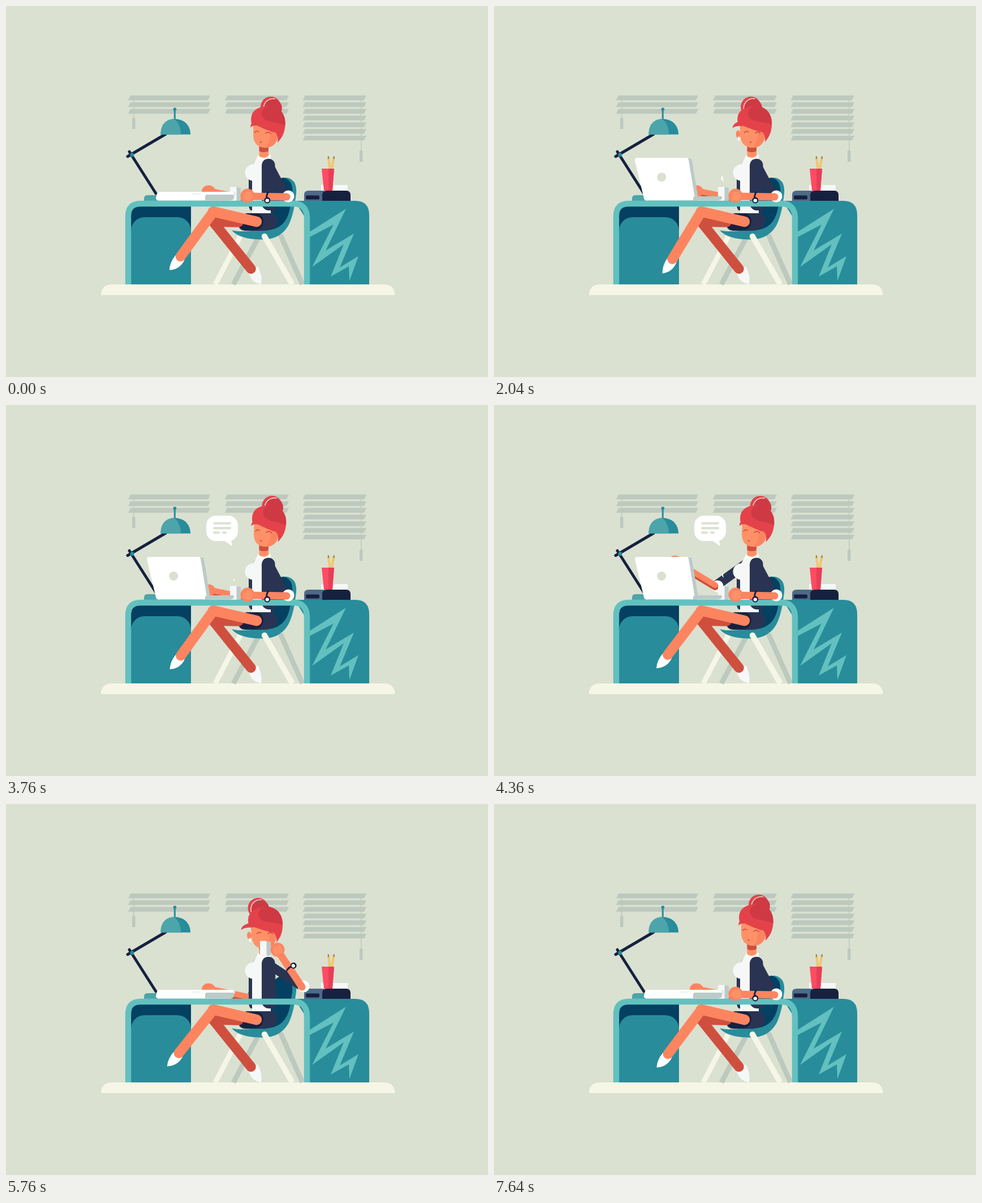
An HTML page with a canvas for the animation above (7680 ms loop, 852x657 px).

```html
<!DOCTYPE html>
<html lang="en">
<head>
<meta charset="utf-8">
<title>Office desk</title>
<style>
html, body { margin: 0; width: 100%; height: 100%; overflow: hidden; background: #dae1d1; }
canvas { display: block; }
</style>
</head>
<body>
<canvas id="stage" width="852" height="657"></canvas>
<script>
const g = document.getElementById('stage').getContext('2d');
const LOOP = 7680;
const C = {
  bg: '#dae1d1', blind: '#bdc9be', teal: '#288c9b', mint: '#62c1bf', sea: '#4ca5aa',
  deep: '#044061', navy: '#2a3452', ink: '#16213f', cream: '#f6f6e6', white: '#fff',
  shirt: '#f6f8f8', grey: '#bccac8', skin: '#fc8560', glow: '#ff9168', shade: '#cf4f3e',
  hair: '#e4424a', dark: '#cf3944'
};

const clamp = x => Math.max(0, Math.min(1, x));
const ease = x => (1 - Math.cos(Math.PI * clamp(x))) / 2;

// Eased value (or list of values) from rows of [time, ...values]
function key(t, rows) {
  let i = 0;
  while (i < rows.length - 2 && t > rows[i + 1][0]) i++;
  const a = rows[i], b = rows[i + 1], k = ease((t - a[0]) / (b[0] - a[0]));
  const out = a.slice(1).map((v, j) => v + (b[j + 1] - v) * k);
  return out.length > 1 ? out : out[0];
}

function fill(d, color) {
  g.fillStyle = color;
  g.fill(new Path2D(d));
}
function stroke(d, color, w, cap = 'round') {
  g.strokeStyle = color;
  g.lineWidth = w;
  g.lineCap = cap;
  g.lineJoin = 'round';
  g.stroke(new Path2D(d));
}
function oval(x, y, rx, ry, color) {
  g.fillStyle = color;
  g.beginPath();
  g.ellipse(x, y, rx, ry, 0, 0, 7);
  g.fill();
}
const dot = (x, y, r, color) => oval(x, y, r, r, color);
function box(x, y, w, h, color, r = 0) {
  g.fillStyle = color;
  g.beginPath();
  g.roundRect(x, y, w, h, r);
  g.fill();
}
function turn(x, y, deg) {
  g.translate(x, y);
  g.rotate(deg * Math.PI / 180);
  g.translate(-x, -y);
}
function group(draw) {
  g.save();
  draw();
  g.restore();
}

function blinds(x1, x2, n) {
  for (let i = 0; i < n; i++) {
    const y = 158.6 + i * 11.85;
    fill(`M${x1 + 4} ${y}H${x2}L${x2 - 4} ${y + 8.4}H${x1}Z`, C.blind);
  }
}

function room() {
  blinds(216, 361, 3);
  blinds(387, 500, 3);
  blinds(524.5, 637, 7);
  box(225, 167, 1.5, 32, C.blind);
  box(223, 198, 5.5, 20, C.blind, 1);
  box(627, 167, 1.5, 90, C.blind);
  box(625, 256, 5.5, 20, C.blind, 1);
  fill('M168 512Q168 493 188 493H667Q687 493 687.5 512Z', C.cream);
  box(221, 353, 106, 140, C.deep);
  box(221, 374, 106, 119, C.teal, [24, 24, 0, 0]);
}

function lamp() {
  fill('M244 345V341Q244 335 250 335H268V345Z', C.sea);
  stroke('M265 332L218 258M215 266.5L282 227', C.ink, 5);
  dot(223, 263.5, 3.5, C.teal);
  box(296.8, 184, 3, 18, C.teal);
  dot(298.4, 183, 2.9, C.teal);
  fill('M273.5 227.5C273 191 326 191 326 227.5Z', C.teal);
  fill('M273.5 227.5C273 206 287 200 297 200Q309 209 309 227.5Z', C.sea);
}

function deskItems() {
  box(557, 317, 47, 12, C.shirt);
  stroke('M570 268L572.5 290M579.5 268L575.5 290', '#efc873', 4.5, 'butt');
  stroke('M569.8 267L570 270M579.8 267L579.4 270', '#8c7a50', 2);
  fill('M558 288H580L577 327H562Z', '#ff4b63');
  fill('M570 288H580L577 327H570Z', '#e53f58');
  fill('M527 345V334Q527 327 535 327H562V345Z', '#4e6a88');
  box(530, 335.5, 24, 7, C.ink, 2);
  box(559, 327, 50, 18, C.ink, [7, 7, 0, 0]);
}

function chair() {
  stroke('M447 408L402 493M485 405L524 493', C.blind, 9, 'butt');
  stroke('M416 404L370 493', C.cream, 9, 'butt');
  fill('M399 397C420 402 440 397 460 394L472 316Q482 303 496 304Q515 307 513 332L510 353Q505 380 497 392Q483 413 455 413.5Q413 414 399 397Z', C.teal);
  fill('M458 397L470 318Q480 304 490 304Q508 307 506 332L502 358Q495 397 458 397Z', C.deep);
  stroke('M457 408L506 493', C.cream, 10, 'butt');
  dot(457, 408, 5.2, C.cream);
}

function leftArm([hx, hy, ex, ey], lean) {
  stroke(`M${446 + lean} 281L${ex} ${ey - 3}`, C.navy, 17);
  dot(ex, ey, 10.5, C.white);
  const x = ex - 4, y = ey - 1;
  stroke(`M${hx} ${hy + 2}L${x} ${y + 2}`, C.shade, 12);
  stroke(`M${hx} ${hy - 1}L${x} ${y - 1}`, C.skin, 10);
  oval(hx, hy, 12, 10.5, C.skin);
}

function torso(lean) {
  group(() => {
    g.transform(1, 0, -lean / 90, 1, lean * 4, 0);
    fill('M429 300H440V362H433Q429 360 429 350Z', C.navy);
    fill('M435 284L446 264H468V367H435Z', C.shirt);
    dot(437, 295, 14.5, C.shirt);
    fill('M452 282Q454 270 465 270Q475 272 476 290L477 362H463Q453 360 452 350Z', C.navy);
  });
}

function skirt() {
  fill('M440 367H470Q479 368 479 384Q474 398 455 398H424Q410 398 411 384Q414 368 430 367Z', C.navy);
  fill('M424 367H444Q455 369 455 383Q452 397 440 397H424Q410 396 411 382Z', C.ink);
}

function legs(swing) {
  fill('M429 472Q433 490 451 493Q454 478 445 461Z', C.shirt);
  stroke('M411 383L366 382L433 465.5', C.shade, 17.5);
  group(() => {
    turn(366, 366, swing);
    fill('M299 441Q289 453 288 467Q307 466 315 449Z', C.white);
    stroke('M366 365L308 443', C.skin, 18);
  });
  stroke('M366 364L443 382', C.skin, 18.5);
}

function neck() {
  fill('M447.5 244H464V268Q455 274 447.5 268Z', C.glow);
  fill('M447.5 244H464V257Q455 261 447.5 257Z', C.shade);
  fill('M445 264Q456 274 467 263L468 272H445Z', C.white);
}

function bun(x) {
  dot(x - 1, 178.5, 18, C.hair);
  g.strokeStyle = C.bg;
  g.lineWidth = 1.6;
  g.beginPath();
  g.arc(x + 3, 181, 16.8, 2.8, 4.9);
  g.stroke();
  dot(x + 3, 181, 15.8, C.dark);
}

function head(lean, [rot, u], dip, mouth) {
  group(() => {
    g.translate(lean * 1.1, 0);
    neck();
    g.translate(0, dip);
    turn(457, 262, rot);
    bun(469 - 16 * u);

    if (u > .4) {
      oval(434 - u, 226, 4, 7, C.skin);
      oval(434.5 - u, 234, 2, 3.5, C.white);
    }
    fill('M437 202H481V226C481 242 471 251 459 251C445 251 437 243 437 228Z', C.glow);
    const s = 466 + 3 * u;
    fill(`M${s} 202H481V226C481 242 471 251 459 251Q467 242 ${s} 225Z`, C.skin);

    group(() => {
      g.translate(7 * u, 0);
      stroke('M440 224Q443 219.5 447 223M459 225.5Q463 221.5 468 226', C.shade, 1.6);
      if (mouth > .1) {
        oval(451, 241, 4.2, 1.5 + 4 * mouth, '#b93436');
        oval(451, 240 - 2 * mouth, 2.6, 1.1, C.white);
      } else {
        dot(450, 241, 1.5, C.shade);
      }
    });

    const lx = 432 - 13 * u;
    fill(`M440 203Q${lx + 1} 205 ${lx} 215Q${lx + 5} 210 442 212Z`, C.hair);
    fill('M434 208C430 187 443 178 464 177C483 178 494 192 493.5 209C493 226 487 234 480 242Q482 230 476 224C464 222 448 213 434 208Z', C.hair);
    fill('M452 189C452 207 474 204 486 209Q491 211 493.5 212C496 189 481 178 466 177Q455 178 452 189Z', C.dark);
  });
}

function steam(t, x, y) {
  if (t < 800 || t > 5400) return;
  const p = ((t - 530) / 1020) % 1;
  const k = Math.sin(Math.PI * p);
  group(() => {
    g.translate(x + 8 + 3 * (p - .5), y - 15 - 14 * (p - .5));
    g.scale(k, k);
    fill('M0 -6Q-6 0 2 6Q0 0 0 -6Z', C.white);
  });
}

function cup(hx, hy) {
  const x = hx - 31, y = hy - 15.5;
  box(x + 9, y + 1, 10, 25, C.grey, 2);
  box(x, y, 11.5, 26, C.shirt, 1);
}

function laptop(c) {
  const b = c * (1 - c);
  const x1 = 253 + 18 * c + 110 * b, x2 = 340 + 60 * c + 45 * b, y = 273 + 60 * c;
  const lid = `M${x1} ${y}H${x2}L351 340H269Z`;
  group(() => {
    g.translate(6 - 5 * c, 1 - c);
    fill(lid, C.grey);
    stroke(lid, C.grey, 8);
  });
  fill(lid, C.white);
  stroke(lid, C.white, 8);
  box(352, 337 - 3 * c, 51, 7 + 3 * c, C.grey, [4, 2, 5, 0]);
  const lx = (x1 + x2 + 620) / 4 - 7 + 21 * c * c;
  oval(lx, (y + 333) / 2, 8, 8 - 7.4 * c, C.bg);
}

function desk() {
  fill('M510 345H617Q642 345 642 370V493H532V380Z', C.teal);
  fill('M535 401L601 359L565 433L615 403L590 463L623 443L607 487L606 461L574 479L597 422L541 462L579 387L535 410Z', C.mint);
  stroke('M216 493V372Q216 350 238 350H508Q532 350 532 376V493', C.mint, 10.4, 'butt');
}

function rightUpperArm(ex, ey, lean) {
  const x = 464 + lean;
  stroke(`M${x + 3} 286L${ex - 6} ${ey - 3}`, C.navy, 16);
  dot(x, 282, 11.5, C.navy);
}

function rightForearm(hx, hy, ex, ey) {
  dot(ex, ey - 1, 10.5, C.white);
  stroke(`M${hx} ${hy + 1}L${ex - 3} ${ey}`, C.skin, 13);
  dot(hx, hy, 12.5, C.skin);
  dot(hx + 1, hy + 1, 8.5, C.glow);
  group(() => {
    g.translate((hx + ex) / 2, (hy + ey) / 2);
    g.rotate(Math.atan2(ey - hy, ex - hx));
    // The watch face rolls to the upper side as the arm lifts
    const side = 7 * Math.cos(Math.PI * clamp((336 - hy) / 30));
    stroke('M0 -7Q-4 0 -1 7', C.ink, 3);
    dot(-1, side, 5.5, C.ink);
    oval(-1, side + .5, 3.3, 3, C.white);
  });
}

function bubble(t) {
  const size = key(t, [[2880, 0], [3180, 1.24], [3420, 1], [4900, 1], [5080, 1.22], [5280, 0]]);
  if (size < .01) return;
  group(() => {
    turn(392, 230, key(t, [[2880, -25], [3180, 0], [4900, 0], [5080, 5]]));
    g.translate(392, 230);
    g.scale(size, size);
    g.translate(-392, -230);
    box(354, 196, 56, 45, C.white, 17);
    fill('M384 239L400 250L397 235Z', C.white);
    [[368, 28, 209.5, 0], [368, 28, 218, 1], [368, 8, 226, 2], [384, 4, 226, 3]].forEach(([x, w, y, i]) => {
      const k = clamp((t - 2940 - i * 60) / 150);
      if (k) stroke(`M${x} ${y}h${w * k}`, C.bg, 4);
    });
  });
}

// Turning points of the swinging foot
const swings = [-330, 420, 1170, 1910, 2650, 3375, 4100, 4810, 5520, 6435, 7350, 8100]
  .map((t, i) => [t, i % 2 ? -6 : 3.4]);

function frame(t) {
  const lean = key(t, [[120, 0], [800, -7], [1100, -7], [1600, 0]]);
  const rest = [358, 328, 436, 344], up = [316, 276, 384, 321];
  const left = key(t, [[120, ...rest], [720, ...up], [1060, ...up], [1500, ...rest], [4000, ...rest],
    [4360, 320, 277, 395, 321], [4700, ...up], [5080, 348, 303, 424, 342], [5420, ...rest]]);
  const low = [427, 336, 499, 338], high = [480, 258, 526, 324];
  let [hx, hy, ex, ey] = key(t, [[4520, ...low], [5277, ...high], [6100, ...high], [7124, ...low]]);
  hx += lean * .5;
  const pose = key(t, [[120, 0, 0], [800, -14, .2], [1100, -14, .2], [1650, 0, .2],
    [2400, -5, 1], [3240, -5, 1], [3800, 1.8, 0], [4500, 1.8, 0],
    [5080, -5, .9], [5600, -5, 1], [7000, 0, 0]]);
  const dip = key(t, [[4700, 0], [5500, 5], [6100, 5], [7100, 0]]);
  const mouth = t > 2850 && t < 3750 ? Math.abs(Math.sin((t - 2850) / 145)) : 0;

  g.fillStyle = C.bg;
  g.fillRect(0, 0, 852, 657);
  room();
  lamp();
  deskItems();
  chair();
  leftArm(left, lean);
  torso(lean);
  head(lean, pose, dip, mouth);
  rightUpperArm(ex, ey, lean);
  skirt();
  legs(key(t, swings));
  cup(hx, hy);
  steam(t, hx - 31, hy - 15.5);
  laptop(key(t, [[120, 1], [720, 0], [4700, 0], [5420, 1]]));
  desk();
  rightForearm(hx, hy, ex, ey);
  bubble(t);
}

const start = performance.now();
function tick() {
  frame((performance.now() - start) % LOOP);
  requestAnimationFrame(tick);
}
tick();
</script>
</body>
</html>
```
